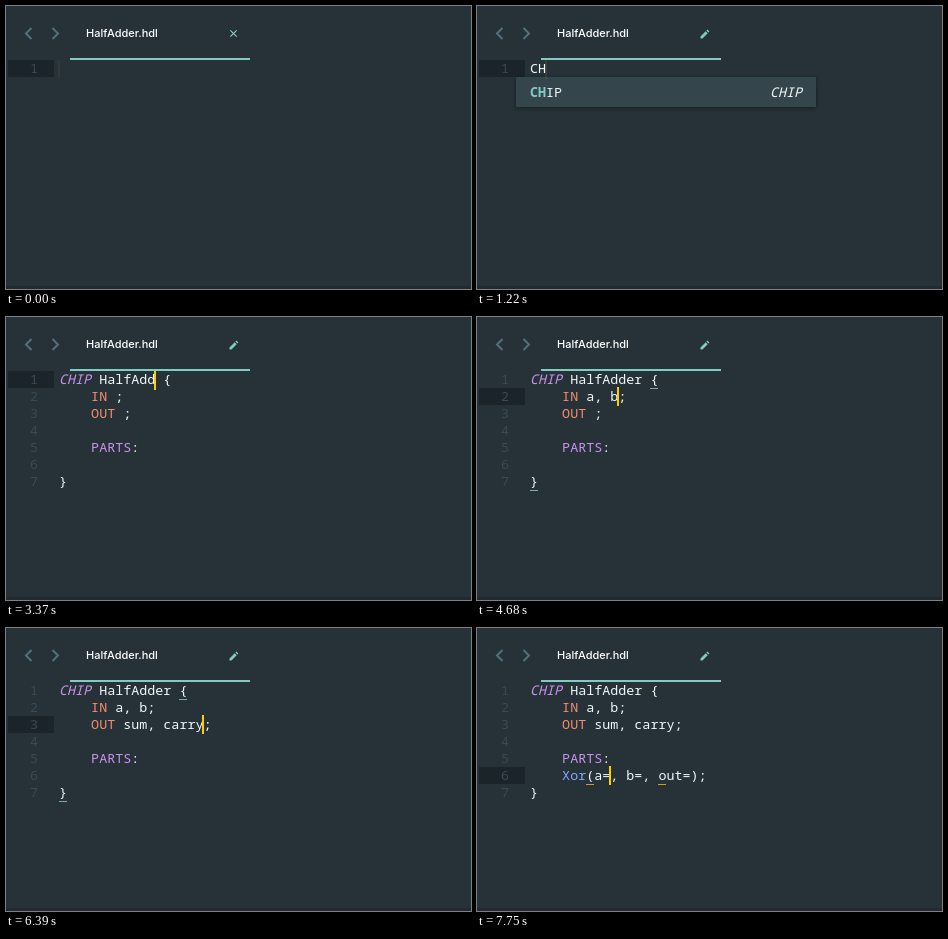
An HTML page that plays this animation: 465 px wide and 283 px high, repeating every 8000 ms.

```html
<!DOCTYPE html>
<html lang="en">
<head>
<meta charset="utf-8">
<title>Editor</title>
<style>
  html, body { margin: 0; width: 100%; height: 100%; overflow: hidden; background: #263238; }
  #stage { position: relative; width: 465px; height: 283px; overflow: hidden; background: #263238;
    font: 500 13.38px/17px "Noto Sans Mono", "DejaVu Sans Mono", monospace; color: #eff8f8; }
  #stage div { position: absolute; white-space: pre; }
  svg { position: absolute; left: 0; top: 0; fill: none; }
  .title { left: 80px; top: 19px; font: 500 11px/17px Inter, Roboto, sans-serif; color: #fff; }
  .bar { left: 64px; top: 52px; width: 180px; height: 2px; background: #80cbc4; }
  .foot { left: 0; top: 280px; width: 465px; height: 3px; background: #212a33; }
  #active { left: 2px; width: 46px; height: 17px; background: #1b2429; }
  .num { left: 2px; width: 30px; text-align: right; color: #3a4a52; font-weight: 400; }
  .line { left: 53px; }
  #caret { width: 2px; background: #fc0; }
  .mark { height: 1px; width: 8px; }
  #popup { width: 300px; background: #2a383e; box-shadow: 0 1px 4px rgba(0, 0, 0, .45); }
  .item { left: 0; width: 300px; height: 30px; line-height: 30px; }
  .item.on { background: #34454c; }
  .item span { position: absolute; left: 14px; }
  .item i { position: absolute; right: 14px; }
  b { color: #80cbc4; font-weight: 700; }
  .key { color: #c792ea; }
  .chip { color: #c792ea; font-style: italic; }
  .port { color: #f78c6c; }
  .part { color: #82aaff; }
</style>
</head>
<body>
<div id="stage">
  <svg width="465" height="283">
    <g stroke="#546e7a" stroke-width="2">
      <path d="M25.5 22 L20 27.5 L25.5 33"/>
      <path d="M46.5 22 L52 27.5 L46.5 33"/>
    </g>
    <path id="close" stroke="#80cbc4" stroke-width="1.2" d="M224.3 24.3 l6.4 6.4 m0 -6.4 l-6.4 6.4"/>
    <path id="pencil" fill="#80cbc4" d="M223.5 32.5 v-2 l5.2 -5.2 2 2 -5.2 5.2 z M229.4 24.6 l1 -1 2 2 -1 1 z"/>
  </svg>
  <div class="title">HalfAdder.hdl</div>
  <div class="bar"></div>
  <div id="active"></div>
  <div id="text"></div>
  <div id="popup"></div>
  <div id="caret"></div>
  <div class="foot"></div>
</div>
<script>
const LOOP = 8000, CHAR = 8.03, LEFT = 53, TOP = 54, ROW = 17;
const CHIP_AT = 1310, XOR_AT = 7690;

// Typed fields and the time of each keystroke
const fields = {
  start: ['CH', [560, 740]],
  name: ['HalfAdder', [2400, 2540, 2690, 2750, 3020, 3190, 3370, 3550, 3670]],
  ins: ['a, b', [4270, 4390, 4510, 4680]],
  outs: ['sum, carry', [5100, 5280, 5460, 5580, 5700, 5820, 5940, 6120, 6270, 6390]],
  part: ['Xo', [7400, 7570]]
};
const jumps = { ins: 3820, outs: 4800, part: 6510 };
const presses = [-500, CHIP_AT, XOR_AT, ...Object.values(jumps),
  ...Object.values(fields).flatMap(f => f[1])].sort((a, b) => a - b);

const el = id => document.getElementById(id);
const tag = (cls, s) => `<span class="${cls}">${s}</span>`;
const typed = (id, t) => fields[id][0].slice(0, fields[id][1].filter(k => k <= t).length);
const colX = col => LEFT + col * CHAR;

function codeLines(t) {
  if (t < CHIP_AT) return [typed('start', t)];
  const part = t < XOR_AT ? typed('part', t) : tag('part', 'Xor') + '(a=, b=, out=);';
  return [
    `${tag('chip', 'CHIP')} ${typed('name', t)} {`,
    `    ${tag('port', 'IN')} ${typed('ins', t)};`,
    `    ${tag('port', 'OUT')} ${typed('outs', t)};`,
    '',
    `    ${tag('key', 'PARTS')}:`,
    part && '    ' + part,
    '}'
  ];
}

function caretCell(t) {
  if (t < CHIP_AT) return [0, typed('start', t).length];
  if (t < jumps.ins) return [0, 5 + typed('name', t).length];
  if (t < jumps.outs) return [1, 7 + typed('ins', t).length];
  if (t < jumps.part) return [2, 8 + typed('outs', t).length];
  return [5, t < XOR_AT ? 4 + typed('part', t).length : 10];
}

// Bracket pair around the caret: [row, col] cells and colour
function brackets(t) {
  if (t < jumps.ins) return [];
  return t < XOR_AT ? [[0, 15, '#80aaa8'], [6, 0, '#80aaa8']]
                    : [[5, 7, '#c9a21a'], [5, 16, '#c9a21a']];
}

function suggestions(t) {
  if (t >= 620 && t < CHIP_AT) return { x: 39, y: 71, words: t < 740 ? ['CHIP', 'CLOCKED'] : ['CHIP'], hit: typed('start', t).length };
  if (t >= 7460 && t < XOR_AT) return { x: 71, y: 156, words: ['Xor'], hit: typed('part', t).length };
  return null;
}

function caretAlpha(t) {
  const age = t - presses.filter(k => k <= t).pop();
  if (age < 270) return 1;
  if (age < 570) return ((570 - age) / 300) ** 2;
  if (age < 900) return 0;
  return Math.min(1, (age - 900) / 250) ** 2;
}

function put(node, key, html) {
  if (node.dataset.key !== key) {
    node.dataset.key = key;
    node.innerHTML = html;
  }
}

function render(t) {
  const [row, col] = caretCell(t);
  const dirty = t >= fields.start[1][0];
  el('close').style.display = dirty ? 'none' : '';
  el('pencil').style.display = dirty ? '' : 'none';
  el('active').style.top = TOP + row * ROW + 'px';

  const html = codeLines(t).map((s, i) => {
    const top = `style="top:${TOP + i * ROW}px"`;
    return `<div class="num" ${top}>${i + 1}</div><div class="line" ${top}>${s}</div>`;
  }).join('') + brackets(t).map(([r, c, color]) =>
    `<div class="mark" style="left:${Math.round(colX(c))}px;top:${TOP + (r + 1) * ROW}px;background:${color}"></div>`
  ).join('');
  put(el('text'), html, html);

  const popup = el('popup'), list = suggestions(t);
  popup.style.display = list ? '' : 'none';
  if (list) {
    popup.style.left = list.x + 'px';
    popup.style.top = list.y + 'px';
    popup.style.height = 30 * list.words.length + 'px';
    const items = list.words.map((w, i) => {
      const hit = i ? Math.min(1, list.hit) : list.hit;
      return `<div class="item${i ? '' : ' on'}" style="top:${30 * i}px"><span><b>${w.slice(0, hit)}</b>${w.slice(hit)}</span><i>${w}</i></div>`;
    }).join('');
    put(popup, items, items);
  }

  const caret = el('caret').style, top = Math.max(TOP, TOP - 1 + row * ROW);
  caret.left = Math.floor(colX(col) - 1) + 'px';
  caret.top = top + 'px';
  caret.height = '19px';
  caret.opacity = caretAlpha(t);
}

const began = performance.now();
function tick() {
  render((performance.now() - began) % LOOP);
  requestAnimationFrame(tick);
}
tick();
</script>
</body>
</html>
```
